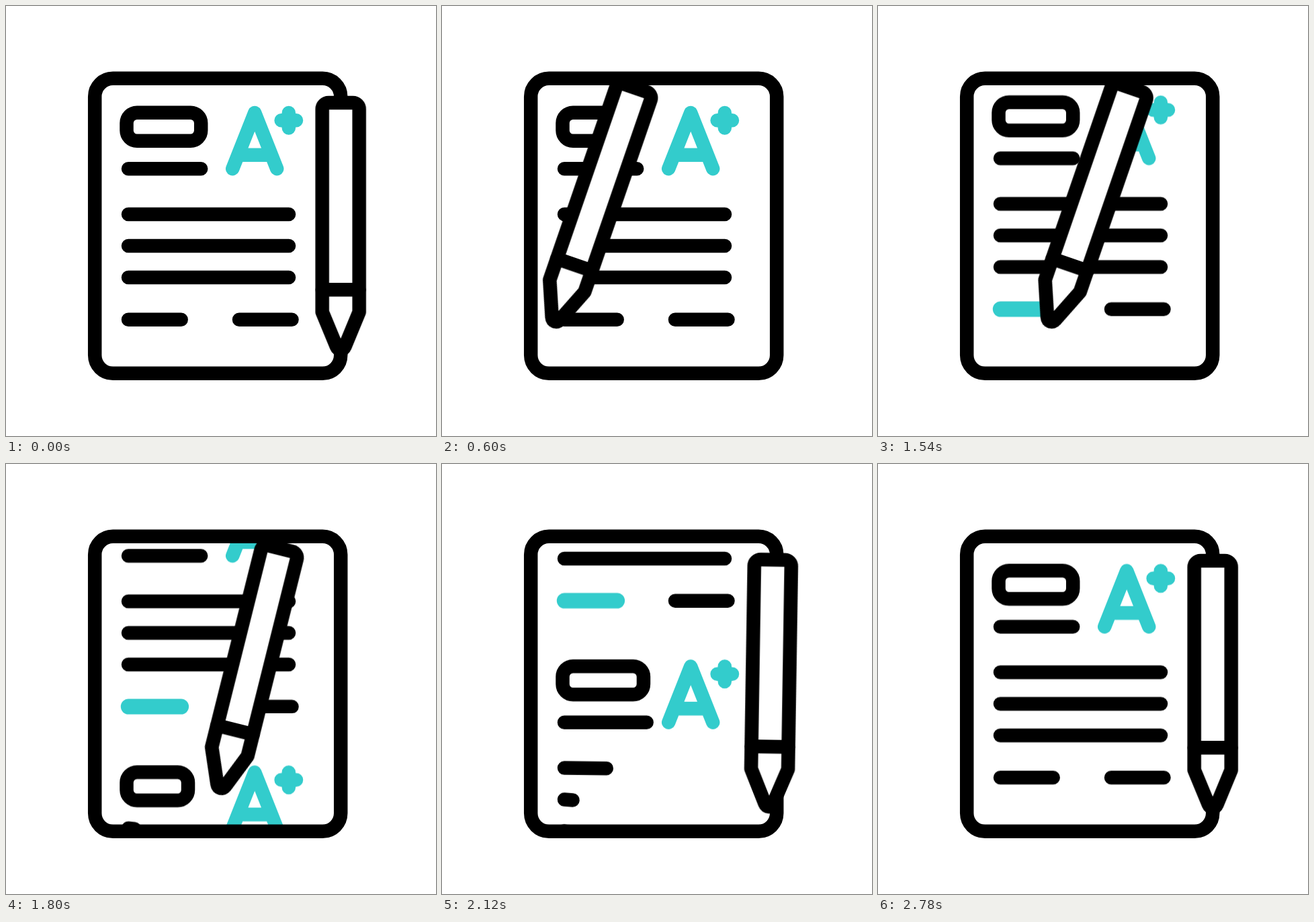
An HTML page without scripts that plays this animation: 640 px wide and 640 px high, repeating every 2.82 s.

```html
<!DOCTYPE html>
<html lang="en">
<head>
<meta charset="utf-8">
<title>Graded paper</title>
<style>
html, body { margin: 0; width: 100%; height: 100%; overflow: hidden; background: #fff; }
svg { display: block; width: 100vw; height: 100vh; }
.ink { fill: none; stroke: #000; stroke-width: 20.5; stroke-linecap: round; stroke-linejoin: round; }
.teal { stroke: #3cc; }
.white { fill: #fff; }

.scroll, .mark, .slide, .swing, .tilt, .box, .short, .long {
  animation: 2820ms cubic-bezier(.333, 0, .667, 1) infinite backwards;
}
.scroll { animation-name: scroll; }
.mark { animation-name: mark; stroke-width: 23; }
.box { animation-name: box; }
.short { animation-name: short; }
.long { animation-name: long; }
.second { animation-delay: 83ms; }
.third { animation-delay: 180ms; }

/* The pencil swings in along a curve, writes, then returns straight. */
.slide { animation-name: slide; }
.swing {
  animation-name: swing;
  offset-path: path("M498.2 328C418 350 300 352 227.8 296");
  offset-rotate: 0deg;
}
.tilt { animation-name: tilt; }

@keyframes scroll {
  0%, 49.645% { transform: translateY(0); }
  92.199%, 100% { transform: translateY(-405.5px); }
}
@keyframes mark {
  0%, 28.36% { opacity: 0; d: path("M182.3 0L182.3 0"); }
  28.37% { opacity: 1; d: path("M182.3 0L182.3 0"); }
  49.645%, 100% { opacity: 1; d: path("M182.3 0L260.6 0"); }
}
@keyframes swing {
  0% { offset-distance: 0%; }
  21.277%, 100% { offset-distance: 100%; }
}
@keyframes slide {
  0%, 28.369% { transform: translate(0, 0); }
  49.645%, 56.738% { transform: translate(88.4px, 0); }
  78.014%, 100% { transform: translate(270.4px, 32px); }
}
@keyframes tilt {
  0%, 78.014%, 100% { transform: rotate(0deg); }
  21.277%, 56.738% { transform: rotate(19deg); }
}
@keyframes box {
  0%, 49.645% { width: 0; }
  70.922% { width: 123.2px; }
  85.106%, 100% { width: 110.7px; }
}
@keyframes short {
  0%, 62.057% { d: path("M182 0L186 1"); }
  76.241% { d: path("M182 0L306.5 0"); }
  85.106%, 100% { d: path("M182 0L290.2 0"); }
}
@keyframes long {
  0%, 70.922% { d: path("M182 0L188 1"); }
  85.106% { d: path("M182 0L447 0"); }
  92.199%, 100% { d: path("M182 0L421 0"); }
}
</style>
</head>
<body>
<svg viewBox="0 0 640 640">
  <defs>
    <clipPath id="page"><rect x="132.2" y="107.7" width="366" height="439"/></clipPath>
    <g id="grade">
      <path class="ink teal" d="M337.2 242.2L370.2 159L403.2 242.2M346 221.7H394"/>
      <path class="ink teal" d="M409.6 170.3H432M420.8 159V181.6"/>
    </g>
    <path id="bars" class="ink" d="M182 466.7H260.7M347 466.7H425.5"/>
  </defs>

  <g clip-path="url(#page)">
    <g class="scroll">
      <rect class="ink" x="179.5" y="158.8" width="110.7" height="41.9" rx="15.5"/>
      <path class="ink" d="M182 242.2H290.2M182 310H421M182 357H421M182 404H421"/>
      <use href="#grade"/>
      <use href="#bars"/>
      <path class="ink teal mark" transform="translate(0 466.7)" d="M182.3 0L260.6 0"/>

      <g transform="translate(0 405.5)">
        <rect class="ink box" x="179.5" y="158.8" width="110.7" height="41.9" rx="15.5"/>
        <g transform="translate(0 242.2)"><path class="ink short" d="M182 0L290.2 0"/></g>
        <g transform="translate(0 310)"><path class="ink long" d="M182 0L421 0"/></g>
        <g transform="translate(0 357)"><path class="ink long second" d="M182 0L421 0"/></g>
        <g transform="translate(0 404)"><path class="ink long third" d="M182 0L421 0"/></g>
        <use href="#grade"/>
        <use href="#bars"/>
      </g>
    </g>
  </g>

  <rect class="ink" x="132.2" y="107.8" width="366" height="439" rx="27"/>

  <g class="slide"><g class="swing"><g class="tilt">
    <path class="ink white" d="M-27.5 127.5V-174.6a9.5 9.5 0 0 1 9.5-9.5H18a9.5 9.5 0 0 1 9.5 9.5V127.5L6 179.5a6.4 6.4 0 0 1-12 0Z"/>
    <path class="ink" d="M-27.5 94.3H27.5"/>
  </g></g></g>
</svg>
</body>
</html>
```
